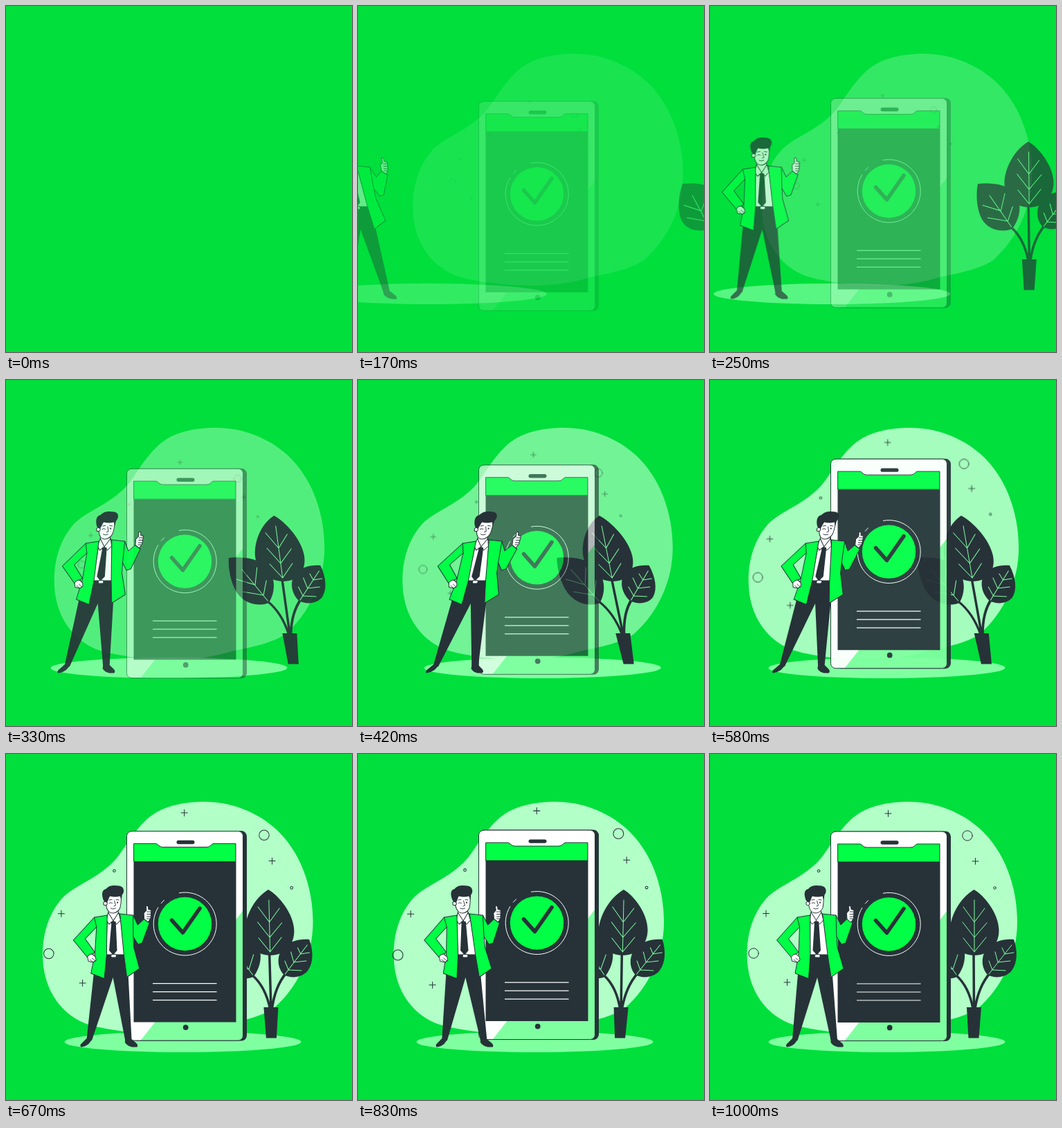
Animation, 500 px wide and 500 px high, one loop 1040 ms. Source, as an HTML page:

```html
<!DOCTYPE html>
<html lang="en">
<head>
<meta charset="utf-8">
<title>Payment confirmed</title>
<style>
  html, body { margin: 0; width: 100%; height: 100%; overflow: hidden; background: #00df3c; }
  svg { display: block; width: 100%; height: 100%; }
  .dark { fill: #263238; }
  .green { fill: #00ff45; }
  .white { fill: #fff; }
  .tint { fill: #80ffa1; }
  .ink { stroke: #263238; stroke-linejoin: round; stroke-linecap: round; }
  .line { fill: none; }
  .vein { fill: none; stroke: #80ffa1; stroke-linecap: round; }
  .stem { fill: none; stroke: #263238; stroke-width: 3.5; }
</style>
</head>
<body>
<svg viewBox="0 0 500 500">
  <defs>
    <clipPath id="body"><rect x="174.5" y="112" width="168" height="302.5" rx="7"/></clipPath>
    <path id="plus" d="M-4.5 0H4.5M0-4.5V4.5"/>
  </defs>

  <g id="blob">
    <path fill="#b2ffc8" d="M287 69C325 69 362 83 390 108C425 140 444 190 444 243C444 292 421 338 388 367C370 380 338 386 310 392C285 400 255 404 232 404C190 404 150 400 120 391C85 380 53.500 345 53.500 290C53.500 255 65 225 85 205C105 188 128 181 149 162C168 147 178 118 205 93.500C226 75 258 69 287 69Z"/>
  </g>

  <g id="icons" class="ink line">
    <use href="#plus" x="257.500" y="86"/>
    <use href="#plus" x="383.500" y="155"/>
    <use href="#plus" x="81" y="230.500"/>
    <use href="#plus" x="111.500" y="330"/>
    <circle cx="372" cy="118" r="7.200"/>
    <circle cx="63" cy="288" r="7.200"/>
    <circle cx="157" cy="169" r="1.800"/>
    <circle cx="411.500" cy="193.500" r="1.800"/>
  </g>

  <g id="shadow"><ellipse class="tint" cx="255.500" cy="416" rx="171" ry="15"/></g>

  <g id="plant">
    <path class="stem" d="M380 368C376 346 367 330 356 320M381.500 368L381 286M383 368C386 348 393 330 405 316"/>
    <path class="dark" d="M371 366H392L388.500 410.500H373.500Z"/>
    <path class="dark" d="M308 257C325 255 350 257 361 270C372 283 370 306 357 322C342 328 322 324 313 307C306 293 305 272 308 257Z"/>
    <path class="vein" d="M325 274L356 319M315 288L341 296L347 271M322 306L351 311L358 290"/>
    <path class="dark" d="M381.500 196C396 204 417 230 417.500 254C418 276 403 291 382 291C363 291 347 277 346.500 257C346.500 235 361 208 381.500 196Z"/>
    <path class="vein" d="M382 211V286M366 221L382 243L397 223M365 243L382 265L400 244M366 266L382 286L399 265"/>
    <path class="dark" d="M439 268C445 285 444 302 436 313C428 323 412 325 401 319C392 309 391 293 400 281C409 271 424 267 439 268Z"/>
    <path class="vein" d="M403 318L436 276M422 280L426 289L439 287M412 286L416 301L434 299M403 299L408 312L427 313"/>
  </g>

  <g id="phone">
    <rect class="dark" x="181" y="111.500" width="167" height="303.500" rx="8"/>
    <rect class="white" x="174.500" y="112" width="168" height="302.500" rx="7"/>
    <path class="tint" clip-path="url(#body)" d="M343 226L194 415H343Z"/>
    <rect class="ink line" x="174.500" y="112" width="168" height="302.500" rx="7"/>
    <path class="dark" d="M184.500 156H332.500V388H184.500Z"/>
    <path class="green ink" d="M185 130H216.500Q218.500 130 220 132Q222.500 135 226.500 135H290Q294 135 296.500 132Q298 130 300 130H332V156H185Z"/>
    <rect class="dark" x="246.500" y="125.300" width="26" height="5.400" rx="2.700"/>
    <circle class="dark" cx="259.700" cy="395.500" r="3.900"/>
    <circle class="green" cx="258.500" cy="246" r="38.700"/>
    <path fill="none" stroke="#fff" d="M250 201.300A45.500 45.500 0 1 1 220 222M224 216.400L228.800 211.400"/>
    <path class="ink line" stroke-width="5.500" d="M239.500 240.500L255.500 258.500L280 223.500"/>
    <path fill="none" stroke="#fff" stroke-width="1.200" d="M212 332H304.500M212 344H304.500M212 356H304.500"/>
  </g>

  <g id="man">
    <path class="dark" d="M141 288H171L177 320L184 413H174.500L155 323L126.500 414L119 412L127 318Z"/>
    <path class="dark" d="M119 411L126.500 413L122 419Q117 423 111 423.500Q109 421 111 419ZM174.500 411L184 412L191 418Q194 421 192 423.500H185Q178 422 174.500 417Z"/>

    <path class="white ink" d="M145 232L163 231L171 290H144Z"/>
    <path class="white ink" d="M146.500 224L146 234L153 243L161 234L160 224Z"/>
    <path class="white ink" d="M146 229L143.500 240L147.500 246L153.500 241ZM161 229L164 240L158.500 246L153.500 241Z"/>
    <path class="dark" d="M150.500 242H157L157.500 246.500L160 284L154.500 290.500L148.500 284L150.800 246.500Z"/>
    <rect class="white ink" x="151.500" y="289.500" width="7.500" height="4.500" rx="1.500"/>

    <path class="green ink" d="M144.500 233L126 236L96.500 269L117.500 294L128 286.500L113.500 267L129.500 250L128 290L123 317L142.500 324.500L145 290Z"/>
    <path class="ink line" d="M126 236L129.500 250"/>
    <path class="green ink" d="M163 231L182 233L189 247L198 238.500L206 244L196 273L190 275L183 264L184 279L193 310L175 322.500L170 290Z"/>
    <path class="ink line" d="M182 233L183 264"/>

    <path class="white ink" d="M117.500 293Q120 289 124 289L129 293L130 298L126 301L119 299.500Z"/>
    <path class="ink line" stroke-width=".8" d="M121 297L126 301M124 295L129 299"/>
    <path class="white ink" d="M198 238.500L197.500 230L201 226L200.500 220Q202.500 218 203.500 221L204 224.500L208 225.500L207.500 237L204 243Z"/>
    <path class="ink line" stroke-width=".9" d="M202 228H208M202 231.500H208M202 235H207.500M202 238H206"/>

    <path class="white ink" d="M142.500 205C141.500 214 142.500 223 146.500 227.500C151.500 232 160 230 163 222C164.500 214 164.500 206 163 202H146Z"/>
    <circle class="white ink" cx="141.500" cy="216" r="2.700"/>
    <path class="dark" d="M139 212C135.500 204 135.500 196 142 195C146 189 155 189.500 161 190.500C168 191.500 169.500 199 165.500 203.500L164.500 211L162.500 205.500C157 207 152 206.500 148 205.500C146 208 146 212 143.500 215Z"/>
    <path class="ink line" stroke-width=".9" d="M147 211L151 210.300M157 210.300L161 211M147 215.500Q149 213.800 151.500 215.500M154.500 212L156.500 219L154 219.800M149.500 223Q152.500 225 156.500 223"/>
    <circle class="dark" cx="159" cy="214.700" r="1.100"/>
  </g>
</svg>
<script>
  const LOOP = 1040, FPS = 24, LAST = 24;
  const parts = {};
  for (const id of ["blob", "icons", "shadow", "plant", "phone", "man"]) {
    parts[id] = document.getElementById(id);
  }

  const curve = (s, a, b) => 3 * a * s * (1 - s) ** 2 + 3 * b * s * s * (1 - s) + s ** 3;

  // cubic-bezier(.36, -.01, .5, 1.38), solved by bisection
  function ease(x) {
    if (x <= 0) return 0;
    if (x >= 1) return 1;
    let low = 0, high = 1;
    for (let i = 0; i < 30; i++) {
      const mid = (low + high) / 2;
      if (curve(mid, .36, .5) < x) low = mid; else high = mid;
    }
    return curve(low, -.01, 1.38);
  }

  function pose(id, transform, opacity) {
    parts[id].setAttribute("transform", transform);
    parts[id].setAttribute("opacity", Math.max(0, Math.min(1, opacity)));
  }

  // Rush in from one side (dir -1 left, 1 right), leaning about height cy
  function rush(id, t, dir, cy) {
    let shift = 0, lean, opacity = 1;
    if (t < .6) {
      const p = ease(t / .6);
      shift = dir * 250 * (1 - p);
      lean = 20 - 30 * p;
      opacity = p;
    } else if (t < .8) {
      lean = -10 + 12 * ease((t - .6) / .2);
    } else {
      lean = 2 - 2 * ease((t - .8) / .2);
    }
    pose(id, `translate(${shift} ${cy}) skewX(${-dir * lean}) translate(0 ${-cy})`, opacity);
  }

  function draw(ms) {
    const step = Math.min(LAST, Math.floor((ms % LOOP + 4) * FPS / 1000));
    const t = step < 2 ? 0 : Math.min(1, (step + .75) / FPS);
    const p = ease(t), slide = 30 * (1 - p);
    pose("blob", `translate(${slide} 0)`, p);
    pose("phone", `translate(0 ${slide})`, p);
    pose("icons", `translate(234.5 208.5) scale(${.5 + p / 2}) translate(-234.5 -208.5)`, p);
    rush("shadow", t, -1, 416);
    rush("man", t, -1, 306);
    rush("plant", t, 1, 303.5);
  }

  const start = performance.now();
  function tick() {
    draw(performance.now() - start);
    requestAnimationFrame(tick);
  }
  tick();
</script>
</body>
</html>
```
